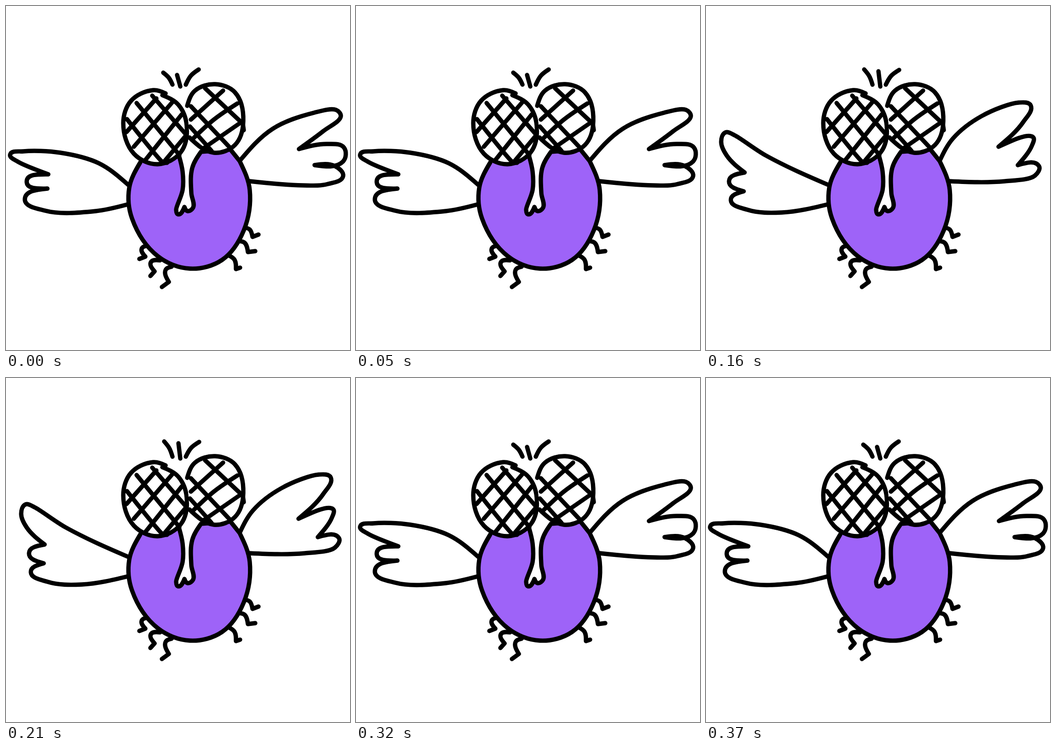
Write an HTML page with a canvas that moves like this. It is 748 by 748 pixels and loops after 0.4 s.

```html
<!DOCTYPE html>
<html lang="en">
<head>
<meta charset="utf-8">
<title>Fly</title>
<style>
  html, body { margin: 0; width: 100%; height: 100%; overflow: hidden; background: #fff; }
  canvas { display: block; }
</style>
</head>
<body>
<canvas id="stage" width="748" height="748"></canvas>
<script>
const ctx = document.getElementById("stage").getContext("2d");
ctx.lineWidth = 9.4;
ctx.lineCap = ctx.lineJoin = "round";

// Adds a smooth curve through the points to the path.
function addSpline(path, points) {
  const last = points.length - 1;
  const length = i => Math.hypot(points[i + 1][0] - points[i][0], points[i + 1][1] - points[i][1]);
  const middle = (p, q) => [(p[0] + q[0]) / 2, (p[1] + q[1]) / 2];

  // Handle of an inner point: side 1 leads out of it, side -1 into it.
  const handle = (i, side) => {
    const before = length(i - 1), after = length(i);
    const direction = [0, 1].map(k =>
      (points[i][k] - points[i - 1][k]) / before + (points[i + 1][k] - points[i][k]) / after);
    const [own, other] = side > 0 ? [after, before] : [before, after];
    const reach = side * Math.min(own, 2 * other) / 3 / Math.hypot(...direction);
    return points[i].map((v, k) => v + direction[k] * reach);
  };

  for (let i = 0; i < last; i++) {
    let a = i > 0 ? handle(i, 1) : null;
    let b = i + 1 < last ? handle(i + 1, -1) : null;
    a ??= middle(points[i], b ?? points[i + 1]);
    b ??= middle(points[i + 1], a);
    path.bezierCurveTo(...a, ...b, ...points[i + 1]);
  }
}

// Text holds x y pairs; "|" makes the point before it a corner, ";" lifts the pen.
function draw(text, fill) {
  const path = new Path2D();
  for (const line of text.split(";")) {
    let corner;
    for (const part of line.split("|")) {
      const values = part.trim().split(/\s+/).map(Number);
      const points = [];
      for (let i = 0; i < values.length; i += 2) points.push([values[i], values[i + 1]]);
      if (corner) points.unshift(corner);
      else path.moveTo(...points[0]);
      addSpline(path, points);
      corner = points.at(-1);
    }
  }
  if (fill) {
    ctx.fillStyle = fill;
    ctx.fill(path);
  }
  ctx.stroke(path);
}

const leftWings = [
  "202 342 118 319 38 316 9 323 25 338 92 366 | 45 382 90 397 | 41 420 85 445 195 446",
  "155 335 62 298 34 300 36 325 91 366 | 56 383 88 399 | 55 416 90 440 152 448",
  "130 325 62 281 42 275 33 295 45 325 84 362 | 50 381 82 403 | 54 422 90 443 165 449",
  "195 357 55 313 22 311 18 325 84 360 | 41 379 84 402 | 43 429 130 462"
];

const rightWings = [
  "580 267 670 232 718 226 728 240 690 272 637 311 | 700 300 735 308 733 338 671 346 | 715 348 733 370 700 387 645 390",
  "550 281 630 234 708 213 712 228 640 307 | 718 290 716 306 677 345 | 721 346 715 366 650 378",
  "537 288 600 239 680 210 706 216 690 252 636 306 | 711 285 708 305 678 346 | 724 348 715 369 650 381",
  "530 294 600 234 680 204 704 209 695 230 635 308 | 716 286 700 320 670 343 | 714 347 700 371 650 374"
];

const hairTips = [
  [[342, 145], [372, 150], [419, 138]],
  [[348, 136], [374, 143], [427, 142]],
  [[344, 138], [375, 142], [420, 139]],
  [[339, 139], [374, 140], [427, 142]]
];

// Each hair bends sideways by its bow on the way from root to tip.
function drawHairs(tips) {
  const hairs = [{ root: [362, 171], bow: 2 }, { root: [379, 175], bow: 0 }, { root: [391, 171], bow: -3 }];
  hairs.forEach(({ root: [x, y], bow }, i) => {
    const [tipX, tipY] = tips[i];
    draw(`${x} ${y} ${(x + tipX) / 2 + bow} ${(y + tipY) / 2 - Math.abs(bow)} ${tipX} ${tipY}`);
  });
}

function drawLegs() {
  draw("308 521 295 528 303 545 | 290 550; 335 553 315 557 323 577 | 314 587; 360 567 347 574 354 600 | 339 611");
  draw("520 482 530 486 536 502 | 549 497; 506 511 519 515 526 535 | 542 533; 484 542 497 552 500 572 | 509 569");
}

function drawBody() {
  const outline = "292 340 268 395 274 462 330 544 400 571 470 552 517 488 530 400 508 337 | 488 312";
  const trunk = "424 317 | 405 352 403 407 407 438 395 446 388 437 | 374 453 370 443 384 400 384 360 376 325";
  draw(outline + "|" + trunk, "#9e63f8");
}

function drawEyes() {
  draw("347 190 320 183 272 206 255 255 278 321 330 344 380 318 393 261 375 215 340 194", "#fff");
  draw("284 211 377 324; 263 246 339 338 350 341; 318 195 391 279");
  draw("327 201 262 274; 361 210 278 306; 382 236 303 335; 391 282 345 337");

  draw("394 217 411 184 455 170 498 188 516 250 498 302 452 319 399 286", "#fff");
  draw("433 179 515 256 | 517 270; 402 218 487 308; 400 262 447 315");
  draw("472 184 402 247; 503 212 452 247 404 291; 511 253 430 309");
}

// Five steps of 80 ms; the last one repeats the first pose.
function render() {
  const pose = Math.floor(performance.now() % 400 / 80) % 4;
  ctx.clearRect(0, 0, 748, 748);
  draw(`266 389 ${leftWings[pose]} 266 431`);
  draw(`508 337 ${rightWings[pose]} 530 381`);
  drawHairs(hairTips[pose]);
  drawLegs();
  drawBody();
  drawEyes();
  requestAnimationFrame(render);
}
render();
</script>
</body>
</html>
```
